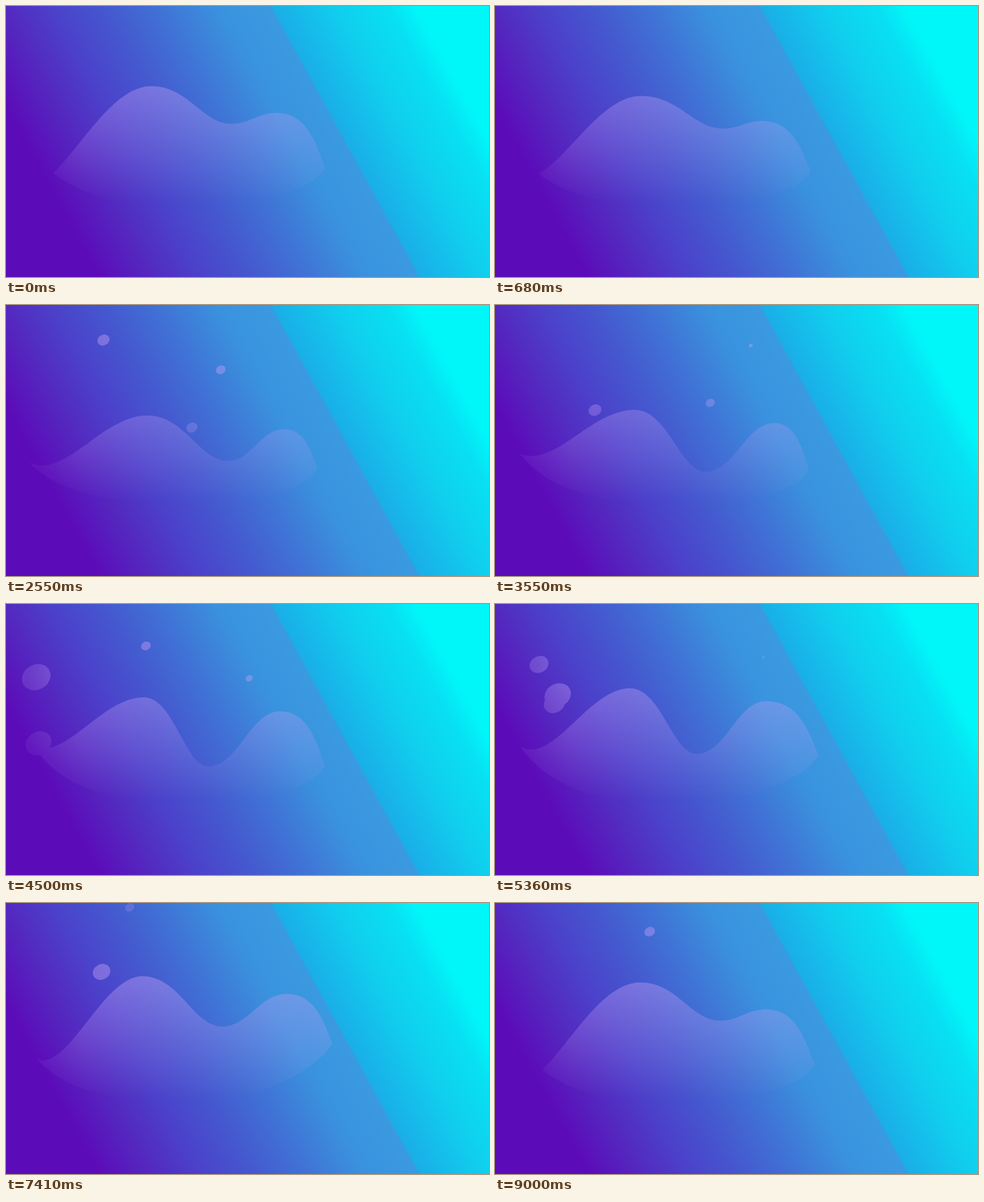
Write an HTML page that moves like this. It is 640 px wide and 360 px high and loops after 9050 ms.

```html
<!DOCTYPE html>
<html lang="en">
<head>
<meta charset="utf-8">
<title>Rising drops</title>
<style>
html, body { margin: 0; width: 100%; height: 100%; overflow: hidden; background: #4558cf; }
svg { display: block; width: 100%; height: 100%; }
</style>
</head>
<body>
<svg viewBox="0 0 640 360" preserveAspectRatio="none">
  <defs>
    <linearGradient id="sky" gradientUnits="userSpaceOnUse" x1="0" y1="360" x2="644" y2="8">
      <stop offset=".147" stop-color="#5c0bb8"/>
      <stop offset=".23" stop-color="#5428c0"/>
      <stop offset=".31" stop-color="#4b42ca"/>
      <stop offset=".39" stop-color="#4558cf"/>
      <stop offset=".474" stop-color="#4072d5"/>
      <stop offset=".57" stop-color="#3a92de"/>
      <stop offset=".653" stop-color="#3a9ae0"/>
      <stop offset=".657" stop-color="#1aaee7"/>
      <stop offset=".76" stop-color="#10cfee"/>
      <stop offset=".84" stop-color="#08e0f2"/>
      <stop offset=".885" stop-color="#00f7f9"/>
    </linearGradient>
    <linearGradient id="mist" gradientUnits="userSpaceOnUse" x1="0" y1="0" x2="0" y2="262">
      <stop offset="0" stop-color="#c09cf4" stop-opacity=".2"/>
      <stop offset=".15" stop-color="#c09cf4" stop-opacity=".45"/>
      <stop offset=".37" stop-color="#c09cf4" stop-opacity=".45"/>
      <stop offset="1" stop-color="#c09cf4" stop-opacity="0"/>
    </linearGradient>
    <linearGradient id="fade" gradientUnits="userSpaceOnUse" x1="30" y1="0" x2="100" y2="0">
      <stop offset="0" stop-color="#fff" stop-opacity=".45"/>
      <stop offset="1" stop-color="#fff"/>
    </linearGradient>
    <mask id="left" maskUnits="userSpaceOnUse" x="0" y="0" width="640" height="360">
      <rect width="640" height="360" fill="url(#fade)"/>
    </mask>
    <clipPath id="liquid"><path id="wave"/></clipPath>
  </defs>
  <rect width="640" height="360" fill="url(#sky)"/>
  <g mask="url(#left)">
    <rect width="640" height="360" fill="url(#mist)" clip-path="url(#liquid)"/>
  </g>
</svg>
<script>
const LOOP = 9050;
const QUARTER = Math.PI / 2;

// Each drop drifts along a straight line while its radius changes
const drops = [
  { time: [1100, 3000], from: [23, 226], to: [162, -9], size: [7, 8] },
  { time: [700, 3700], from: [184, 146], to: [347, 49], size: [8, 5] },
  { time: [700, 2500], from: [370, 174], to: [447, 122], size: [9, 5] },
  { time: [2000, 5500], from: [225, 181], to: [361, 66], size: [8, 3] },
  { time: [2700, 5300], from: [85, 215], to: [230, -15], size: [10, 4.5] },
  { time: [3600, 7000], from: [21, 115], to: [93, 48], size: [25, 0] },
  { time: [3900, 7700], from: [18, 222], to: [176, -12], size: [19, 5] },
  { time: [5000, 9300], from: [82, 122], to: [224, 25], size: [18, 6], power: 2 }
];

const wave = document.getElementById("wave");
for (const drop of drops) {
  drop.el = document.createElementNS("http://www.w3.org/2000/svg", "ellipse");
  wave.parentNode.appendChild(drop.el);
}

const mix = ([a, b], u) => a + (b - a) * u;

// The liquid sways: every anchor is a slow cosine with an optional overtone
function wavePath(t) {
  const turn = t / LOOP * 2 * Math.PI;
  const sway = (mid, amp, lag, amp2 = 0, lag2 = 0) =>
    mid + amp * Math.cos(turn - lag) + amp2 * Math.cos(2 * turn - lag2);

  const lx = sway(41, 13, 0, 9), ly = sway(206, 17, .36);
  const ax = sway(185, 7.3, .81, 2.5), ay = sway(119, 24.5, 1.93, 4, Math.PI);
  const vx = sway(286, 17.5, .54, 3, Math.PI), vy = sway(186, 32.6, 2.7, 4, -QUARTER);
  const bx = sway(364, 2.7, -2.4, 7.2, -2), by = sway(142, 23.5, QUARTER);
  const rx = sway(423, 10.5, -QUARTER), ry = sway(207, 17, QUARTER, 8);

  const rise = ax - lx, down = vx - ax, up = (bx - vx) * .42, end = rx - bx;
  const steep = (lx - 48) / 45;
  return `M${lx} ${ly}
    C${lx + rise * .3} ${ly - steep * (ly - ay)} ${ax - rise * .38} ${ay} ${ax} ${ay}
    C${ax + down * .47} ${ay} ${vx - down * .36} ${vy} ${vx} ${vy}
    C${vx + up} ${vy} ${bx - up} ${by} ${bx} ${by}
    C${bx + end * .6} ${by} ${rx - end * .2} ${ry - (ry - by) * .48} ${rx} ${ry}
    C${rx - 15} ${ry + 28} 345 262 260 264
    C180 266 ${lx + 50} 262 ${lx} ${ly}Z`;
}

function drawDrop({ el, time: [born, gone], from, to, size, power = 1 }, t) {
  const u = Math.min(Math.max((t - born) / (gone - born), 0), 1);
  const swell = Math.max(0, Math.min(1, (t - born) / 300, (gone - t) / 300));
  const r = mix(size, u) * swell, way = u ** power;
  const x = mix([from[0], to[0]], way), y = mix([from[1], to[1]], way);
  el.setAttribute("rx", r * 1.07);
  el.setAttribute("ry", r * .9);
  el.setAttribute("transform", `translate(${x} ${y}) rotate(-30)`);
}

function draw(t) {
  wave.setAttribute("d", wavePath(t));
  drops.forEach(drop => drawDrop(drop, t));
}

const start = performance.now();
function tick() {
  draw((performance.now() - start) % LOOP);
  requestAnimationFrame(tick);
}
tick();
</script>
</body>
</html>
```
